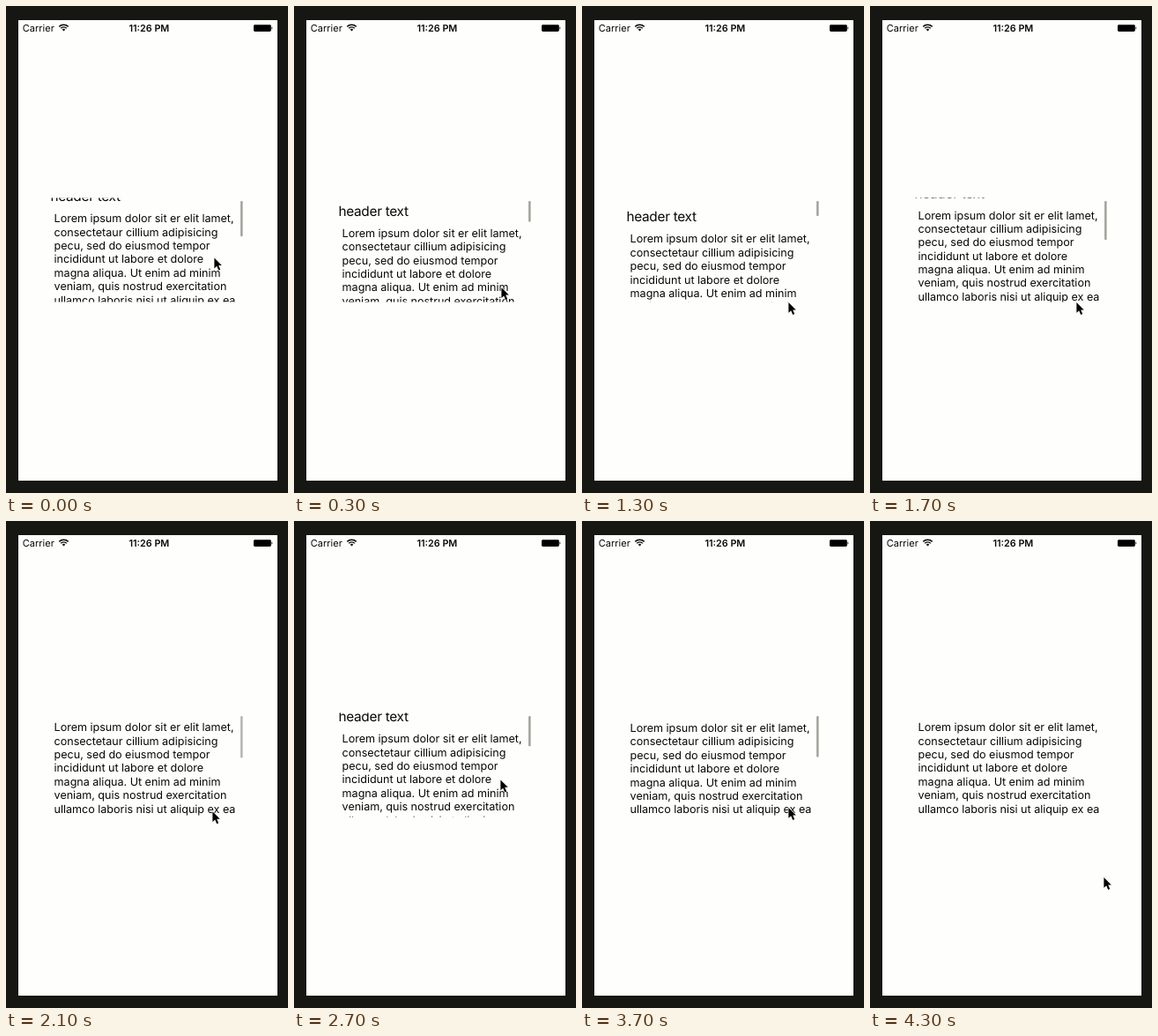
An HTML page that plays this animation: 320 px wide and 552 px high, repeating every 4.4 s.

```html
<!DOCTYPE html>
<html lang="en">
<head>
<meta charset="utf-8">
<title>Scroll view bounce</title>
<style>
  html, body { margin: 0; width: 100%; height: 100%; overflow: hidden; background: #161612; }
  svg { display: block; width: 100%; height: 100%; }
  text { font-family: Inter, Roboto, sans-serif; fill: #080806; text-rendering: geometricPrecision; }
  .status { font-size: 11px; }
  .time { font-size: 10.8px; font-weight: 600; text-anchor: middle; }
  .header { font-size: 15.4px; letter-spacing: -.3px; }
  .body { font-size: 12.6px; letter-spacing: -.03px; }
</style>
</head>
<body>
<svg viewBox="0 0 320 552">
  <clipPath id="view"><rect x="45" y="217.5" width="226" height="118"/></clipPath>
  <rect width="320" height="552" fill="#161612"/>
  <rect x="14" y="16" width="294" height="522" fill="#fefefc"/>

  <text class="status" x="18.8" y="29">Carrier</text>
  <g transform="translate(65.5 28.6)" fill="none" stroke="#080806" stroke-width="1.5">
    <path d="M-5.2 -5.2A7.3 7.3 0 0 1 5.2 -5.2M-3.3 -3.3A4.7 4.7 0 0 1 3.3 -3.3"/>
    <path d="M0 0L-1.8 -1.8A2.5 2.5 0 0 1 1.8 -1.8Z" fill="#080806" stroke="none"/>
  </g>
  <text class="time" x="162.4" y="29">11:26 PM</text>
  <rect x="281" y="21.2" width="19.8" height="7.8" rx="1.4"/>
  <path d="M301.5 23.7a1.5 1.5 0 0 1 0 2.8z"/>

  <g clip-path="url(#view)">
    <g id="content">
      <text class="header" x="50.4" y="-19.4">header text</text>
    </g>
  </g>
  <rect id="bar" x="266.1" y="221" width="2.5" rx="1.2" fill="#a2a29c"/>
  <path id="cursor" d="M.4 0V11.8L3.2 9.2L5.2 14L7.2 13.1L5.2 8.4H8.8Z"
        stroke="#fefefc" stroke-width="1.2" paint-order="stroke"/>
</svg>
<script>
const LOOP = 4400, STEP = 100;
const REST = 233.5, VIEW_H = 118, LINE = 15.4;
const LINES = [
  'Lorem ipsum dolor sit er elit lamet,',
  'consectetaur cillium adipisicing',
  'pecu, sed do eiusmod tempor',
  'incididunt ut labore et dolore',
  'magna aliqua. Ut enim ad minim',
  'veniam, quis nostrud exercitation',
  'ullamco laboris nisi ut aliquip ex ea'
];
// Each drag: pull time span, release time, finger travel, bar fade span
const DRAGS = [
  { from: -90, to: 660, release: 1450, y: 274, pull: 62, fade: [2050, 2300] },
  { from: 2550, to: 3100, release: 3350, y: 271, pull: 54, fade: [3950, 4250] }
];

const $ = id => document.getElementById(id);
const content = $('content'), bar = $('bar'), cursor = $('cursor');

LINES.forEach((line, i) => {
  const el = document.createElementNS('http://www.w3.org/2000/svg', 'text');
  el.setAttribute('class', 'body');
  el.setAttribute('x', 54.6);
  el.setAttribute('y', 4.6 + i * LINE);
  el.textContent = line;
  content.append(el);
});

const progress = (t, a, b) => Math.min(1, Math.max(0, (t - a) / (b - a)));
const mix = (a, b, k) => a + (b - a) * k;
const smooth = k => k * k * (3 - 2 * k);
const rubber = d => VIEW_H * (1 - 1 / (1 + .66 * d / VIEW_H));

function spring(ms) {
  const k = Math.max(0, ms) * .015;
  return (1 + k) * Math.exp(-k);
}

function pointer(t, drag, travel) {
  if (t < 2050) return [mix(236, 234, progress(t, 0, 600)), drag.y + travel];
  if (t < 2550) return [234, mix(336, 271, smooth(progress(t, 2050, 2300)))];
  const k = smooth(progress(t, 3950, 4300));
  return [mix(234, 265, k), mix(drag.y + travel, 404, k)];
}

function draw(t) {
  const drag = DRAGS[t < 2550 ? 0 : 1];
  const travel = drag.pull * Math.sin(progress(t, drag.from, drag.to) * Math.PI / 2);
  const offset = rubber(travel) * spring(t - drag.release);
  const [x, y] = pointer(t, drag, travel);
  content.setAttribute('transform', `translate(0 ${REST + offset})`);
  bar.setAttribute('height', 47.5 - offset);
  bar.setAttribute('opacity', 1 - progress(t, ...drag.fade));
  cursor.setAttribute('transform', `translate(${x} ${y})`);
}

const start = performance.now();
function tick() {
  const t = (performance.now() - start) % LOOP;
  draw(Math.floor(t / STEP) * STEP);
  requestAnimationFrame(tick);
}
tick();
</script>
</body>
</html>
```
